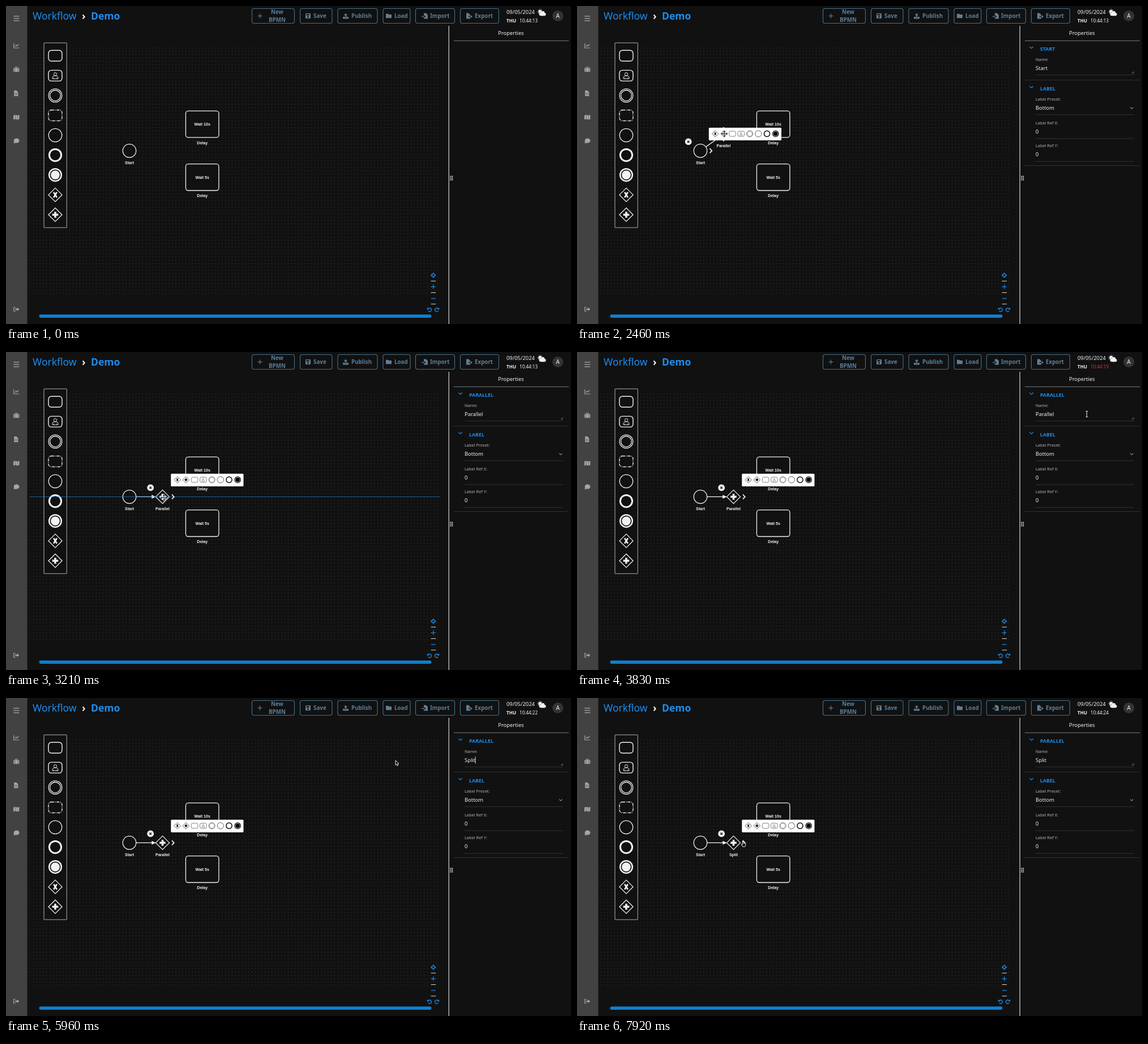
Recreate the animation shown at these times as an HTML page with a canvas. Size 998x561 px, loop 8 s.

```html
<!DOCTYPE html>
<html lang="en">
<head>
<meta charset="utf-8">
<title>Workflow editor</title>
<style>
html, body { margin: 0; width: 100%; height: 100%; overflow: hidden; background: #111; }
canvas { display: block; width: 998px; height: 561px; }
</style>
</head>
<body>
<canvas id="stage" width="998" height="561"></canvas>
<script>
const LOOP = 8000, W = 998, H = 561, GRID = 5.85, TAU = Math.PI * 2;
const BG = '#111', FG = '#f2f2f2', BLUE = '#1b8df0', STEEL = '#5b7f9a';
const UI = '"Noto Sans", sans-serif', DIAGRAM = '"Liberation Sans", Arial, sans-serif';
const START = { x: 218, y: 255.4 };
const screen = document.getElementById('stage').getContext('2d');
let c = screen;

function text(str, x, y, size, color = FG, weight = 400, align = 'left', family = UI) {
  c.font = `${weight} ${size}px ${family}`;
  c.fillStyle = color;
  c.textAlign = align;
  c.fillText(str, x, y);
}
const label = (str, x, y) => text(str, x, y + 2.5, 7.02, FG, 700, 'center', DIAGRAM);

function line(points, color = FG, width = 1, dash = []) {
  c.beginPath();
  for (let i = 0; i < points.length; i += 2) c.lineTo(points[i], points[i + 1]);
  c.strokeStyle = color;
  c.lineWidth = width;
  c.setLineDash(dash);
  c.stroke();
  c.setLineDash([]);
}
function poly(points, fill, stroke, width = 1) {
  c.beginPath();
  for (let i = 0; i < points.length; i += 2) c.lineTo(points[i], points[i + 1]);
  c.closePath();
  paint(fill, stroke, width);
}
function paint(fill, stroke, width = 1) {
  c.lineWidth = width;
  if (fill) { c.fillStyle = fill; c.fill(); }
  if (stroke) { c.strokeStyle = stroke; c.stroke(); }
}
function circle(x, y, r, fill, stroke, width) {
  c.beginPath();
  c.arc(x, y, r, 0, TAU);
  paint(fill, stroke, width);
}
function box(x, y, w, h, r, fill, stroke, width) {
  c.beginPath();
  c.roundRect(x, y, w, h, r);
  paint(fill, stroke, width);
}
function at(x, y, scale, draw) {
  c.save();
  c.translate(x, y);
  c.scale(scale, scale);
  draw();
  c.restore();
}

// Diagram symbols, drawn around the origin with a half size of 12.
const task = (fg, bg) => box(-12, -9.5, 24, 19, 5, bg, fg, 1.4);
const diamond = (fg, bg) => poly([0, -12, 12, 0, 0, 12, -12, 0], bg, fg, 1.3);
const symbols = {
  task,
  user(fg, bg) {
    task(fg, bg);
    c.beginPath();
    c.moveTo(-5, 5.5);
    c.lineTo(-5, 3);
    c.quadraticCurveTo(-4.5, 0.8, -1.8, 0.2);
    c.lineTo(1.8, 0.2);
    c.quadraticCurveTo(4.5, 0.8, 5, 3);
    c.lineTo(5, 5.5);
    c.closePath();
    paint(null, fg, 0.9);
    circle(0, -2.6, 2.7, null, fg, 0.9);
    line([-2.8, 5.5, -2.8, 3.4], fg, 0.8);
    line([2.8, 5.5, 2.8, 3.4], fg, 0.8);
  },
  double(fg, bg) {
    circle(0, 0, 11.8, bg, fg, 1.3);
    circle(0, 0, 9.4, null, fg, 1.3);
  },
  dashed(fg, bg) {
    c.setLineDash([5, 1.5, 1.2, 1.5]);
    task(fg, bg);
    c.setLineDash([]);
  },
  circle: (fg, bg) => circle(0, 0, 11.7, bg, fg, 1.3),
  thick: (fg, bg) => circle(0, 0, 10.6, bg, fg, 3),
  end(fg, bg) {
    circle(0, 0, 10.8, bg, fg, 2.5);
    circle(0, 0, 7.9, fg);
  },
  exclusive(fg, bg) {
    diamond(fg, bg);
    line([-2.8, -4.6, 2.8, 4.6], fg, 2.6);
    line([2.8, -4.6, -2.8, 4.6], fg, 2.6);
  },
  parallel(fg, bg) {
    diamond(fg, bg);
    line([-5.3, 0, 5.3, 0], fg, 3.6);
    line([0, -5.3, 0, 5.3], fg, 3.6);
  }
};
const symbol = (name, x, y, scale = 1, fg = FG, bg = BG) =>
  at(x, y, scale, () => symbols[name](fg, bg));

const page = (x, color) => poly([x, -5, x + 4, -5, x + 7, -2, x + 7, 5, x, 5], color);
const icons = {
  plus(k) { line([-4, 0, 4, 0], k, 1.2); line([0, -4, 0, 4], k, 1.2); },
  save(k) {
    box(-4.5, -4.5, 9, 9, 1.2, k);
    c.fillStyle = BG;
    c.fillRect(-3, -3.2, 5, 2.4);
    circle(0, 2, 1.4, BG);
  },
  upload(k) {
    box(-5, 1.5, 10, 3.5, 0.8, k);
    poly([0, -5, 3.8, -1, 1.3, -1, 1.3, 2.6, -1.3, 2.6, -1.3, -1, -3.8, -1], k, BG, 0.6);
  },
  folder(k) { poly([-5, -3.8, -1, -3.8, 0.3, -2.6, 5, -2.6, 5, 3.8, -5, 3.8], k); },
  fileIn(k) {
    page(-2, k);
    line([-6, 1, -2, 1], k, 1.4);
    poly([-1.5, -1.5, 1.5, 1, -1.5, 3.5], BG);
  },
  fileOut(k) {
    page(-5, k);
    line([-1, 1, 2, 1], BG, 1.6);
    line([2, 1, 4, 1], k, 1.4);
    poly([3, -1.6, 6, 1, 3, 3.6], k);
  },
  menu(k) { for (const y of [-4, 0, 4]) line([-5, y, 5, y], k, 1.3); },
  chart(k) {
    line([-4.5, -4, -4.5, 4, 5, 4], k, 1.2);
    line([-2.5, 1.5, -0.5, -1, 1, 0.7, 4.2, -2.6], k, 1.2);
  },
  suitcase(k) {
    box(-5, -2.8, 10, 7, 1, k);
    box(-2, -4.4, 4, 2.4, 0.6, null, k, 1);
    line([-2.7, -2.8, -2.7, 4.2], '#424242', 0.7);
    line([2.7, -2.8, 2.7, 4.2], '#424242', 0.7);
  },
  file(k) {
    page(-4, k);
    line([-2.5, 0, 1.5, 0], '#424242', 0.8);
    line([-2.5, 2.3, 1.5, 2.3], '#424242', 0.8);
  },
  map(k) {
    for (const [x, d] of [[-5.2, 1], [-1.6, -1], [2, 1]])
      poly([x, -3.5 + d * 0.6, x + 3.1, -3.5 - d * 0.6, x + 3.1, 4 - d * 0.6, x, 4 + d * 0.6], k);
  },
  chat(k) {
    c.beginPath();
    c.ellipse(0.3, -0.4, 4.9, 4, 0, 0, TAU);
    paint(k);
    poly([-4, 1, -4.8, 4.4, -0.5, 3], k);
  },
  leave(k) {
    line([-1.5, -3.5, -4.5, -3.5, -4.5, 3.5, -1.5, 3.5], k, 1.2);
    line([-2.2, 0, 2, 0], k, 2.2);
    poly([1.4, -3.3, 5, 0, 1.4, 3.3], k);
  },
  target(k) {
    circle(0, 0, 3, null, k, 1.2);
    for (let i = 0; i < 4; i++) { line([1.2, 0, 4.8, 0], k, 1.2); c.rotate(Math.PI / 2); }
  },
  turn(k) {
    c.beginPath();
    c.arc(0, 0, 3.2, -2.5, 2.5);
    paint(null, k, 1.2);
    poly([-4.4, -4.2, -4.4, -0.5, -0.8, -0.5], k);
  }
};
const icon = (name, x, y, color) => at(x, y, 1, () => icons[name](color));

function drawGrid() {
  c.fillStyle = '#a0a0a0';
  for (let i = 0; i <= 123; i++)
    for (let j = 0; j <= 74; j++) c.fillRect(42.2 + i * GRID, 73.8 + j * GRID, 0.6, 0.6);
}

function drawHeader() {
  text('Workflow', 47, 24, 17.5, BLUE);
  text('›', 134, 24, 18, FG, 700);
  text('Demo', 150, 24, 17.5, BLUE, 700);
  const buttons = [
    [434.5, 75, 'plus', 448.5], [519.5, 56.5, 'save', 533.5, 'Save', 543],
    [586, 70, 'upload', 600, 'Publish', 610], [666, 48, 'folder', 676, 'Load', 686],
    [723.5, 69, 'fileIn', 740, 'Import', 749], [802.5, 68, 'fileOut', 818, 'Export', 828]
  ];
  for (const [x, w, name, iconX, caption, textX] of buttons) {
    box(x, 4.5, w, 26, 3.5, null, '#46718f', 1.1);
    icon(name, iconX, 17.5, STEEL);
    if (caption) text(caption, textX, 21.2, 9.8, STEEL, 700);
  }
  text('New', 479, 14.2, 9.8, STEEL, 700, 'center');
  text('BPMN', 479, 28.2, 9.8, STEEL, 700, 'center');
  text('09/05/2024', 884, 14.2, 9.4);
  text('THU', 884, 28.7, 8.1, FG, 700);
  for (let i = 0; i < 5; i++) {
    const a = 2.4 + i * 0.75;
    line([943.5 + 4 * Math.cos(a), 10 + 4 * Math.sin(a), 943.5 + 5 * Math.cos(a), 10 + 5 * Math.sin(a)], FG, 1);
  }
  circle(943.5, 10, 3.2, FG);
  c.beginPath();
  c.arc(944.5, 14.3, 2.8, 0, TAU);
  c.arc(948, 12.4, 3.4, 0, TAU);
  c.arc(951, 14.6, 2.6, 0, TAU);
  c.rect(944.5, 13.5, 6.5, 3.7);
  paint(FG, BG, 0.7);
  c.fill();
  circle(974.8, 17.5, 9.6, '#333');
  text('A', 974.8, 21.1, 10, FG, 400, 'center');
}

function drawStatic() {
  c.fillStyle = BG;
  c.fillRect(0, 0, W, H);
  drawGrid();
  c.fillStyle = '#424242';
  c.fillRect(0, 0, 37.5, H);
  ['menu', 'chart', 'suitcase', 'file', 'map', 'chat', 'leave'].forEach((name, i) =>
    icon(name, 18.3, i === 0 ? 22 : i === 6 ? 535 : 28 + i * 42, '#a6a6a6'));
  drawHeader();

  box(67, 65, 40.3, 326, 0.5, BG, '#c4c4c4', 0.9);
  ['task', 'user', 'double', 'dashed', 'circle', 'thick', 'end', 'exclusive', 'parallel']
    .forEach((name, i) => symbol(name, 87, 87.8 + i * 35.05));

  symbol('circle', START.x, START.y);
  label('Start', START.x, 276);
  [['Wait 10s', 208.5], ['Wait 5s', 302.1]].forEach(([name, y]) => {
    box(317.45, y - 23.4, 58.5, 46.8, 4.5, BG, FG, 1.3);
    label(name, 346.7, y);
    label('Delay', 346.7, y + 32.5);
  });

  box(58.5, 544.3, 693, 5.6, 2.8, '#0f7fd0');
  icon('target', 754.8, 475, BLUE);
  icon('plus', 754.8, 495.3, BLUE);
  line([751, 516, 758.8, 516], BLUE, 1.2);
  for (const y of [485.3, 505.6, 525.8]) line([750.7, y, 759.2, y], '#ddd', 1);
  icon('turn', 748.3, 536, BLUE);
  c.save();
  c.translate(760.8, 536);
  c.scale(-1, 1);
  icons.turn(BLUE);
  c.restore();

  line([782.3, 35, 782.3, H], '#d8d8d8', 1.2);
  for (let i = 0; i < 6; i++) c.fillStyle = '#ddd', c.fillRect(784.4 + (i % 2) * 3, 299.7 + (i >> 1) * 3, 1.9, 1.9);
  text('Properties', 892, 51.4, 9.4, FG, 400, 'center');
  line([791, 61.3, 994, 61.3], '#8a8a8a', 0.9);
}

function nameAt(t) {
  const typed = [5210, 5460, 5670, 5790, 5960].filter(key => t >= key).length;
  return t < 2500 ? 'Start' : typed ? 'Split'.slice(0, typed) : 'Parallel';
}

function drawProperties(t, cursorX) {
  const rule = (y, x0, x1, color) => line([x0, y, x1, y], color, 0.8);
  const section = (title, y) => {
    line([799.5, y - 7.5, 802.7, y - 4.5, 805.9, y - 7.5], BLUE, 1.2);
    text(title, 818, y, 8.8, BLUE, 700);
  };
  const field = (caption, value, y) => {
    text(caption, 810, y, 7.4, '#b4b4b4');
    text(value, 810, y + 16.2, 9.4);
    rule(y + 25.2, 810, 984, '#3c3c3c');
  };
  const name = nameAt(t);
  section(t < 2500 ? 'START' : 'PARALLEL', 79.3);
  if (t >= 4130 && t < 5210) {
    const left = Math.min(842.5, Math.max(810, cursorX));
    c.fillStyle = '#2a6fc4';
    c.fillRect(left, 103, 842.5 - left, 13.5);
  }
  field('Name:', name, 96.5);
  if (t >= 5210 && t < 6880) {
    const x = 810 + c.measureText(name).width;
    c.font = `9.4px ${UI}`;
    line([810 + c.measureText(name).width, 103.3, x, 115.7], FG, 0.9);
  }
  line([980, 119, 984, 115.5], '#aaa', 0.7);
  line([982.3, 119, 984, 117.5], '#aaa', 0.7);
  rule(130.7, 791, 994, '#3a3a3a');
  section('LABEL', 149);
  field('Label Preset:', 'Bottom', 166.5);
  line([977.2, 178.8, 979.8, 181.4, 982.4, 178.8], '#ddd', 1);
  field('Label Ref X:', '0', 208.7);
  field('Label Ref Y:', '0', 249);
  rule(281.5, 791, 994, '#3a3a3a');
}

function drawToolbar({ x, y }) {
  circle(x - 21.3, y - 16, 5.9, FG);
  line([x - 23.1, y - 17.8, x - 19.5, y - 14.2], '#111', 1.3);
  line([x - 19.5, y - 17.8, x - 23.1, y - 14.2], '#111', 1.3);
  line([x + 16.5, y - 4, x + 20.3, y, x + 16.5, y + 4], FG, 1.7);
  box(x + 14.8, y - 40.6, 128.2, 22.2, 1.5, '#fff');
  ['exclusive', 'parallel', 'task', 'user', 'double', 'circle', 'thick', 'end'].forEach((name, i) =>
    symbol(name, x + 26.2 + i * 15.22, y - 30, 0.48, i > 1 && i < 5 ? '#444' : '#000', '#fff'));
}

function drawLink(to) {
  const dx = to.x - START.x, dy = to.y - START.y, d = Math.hypot(dx, dy);
  const reach = 11.7 * d / (Math.abs(dx) + Math.abs(dy));
  at(START.x, START.y, 1, () => {
    c.rotate(Math.atan2(dy, dx));
    const tip = d - reach;
    line([11.7, 0, tip - 5, 0], FG, 1.3);
    poly([tip, 0, tip - 7.5, -3.3, tip - 7.5, 3.3], FG);
  });
}

// Pointer path: time, x, y and, when it changes, the pointer style.
const path = [
  [580, 334, 526, 'arrow'], [670, 258, 437], [830, 256, 434], [1170, 208, 259, 'move'],
  [1330, 208, 259], [1400, 218, 256, 'arrow'], [1630, 248, 240], [1670, 257, 240],
  [1830, 259, 240], [2120, 260, 234, 'hand'], [2290, 261, 227], [2455, 260, 225, 'move'],
  [2750, 278, 245], [3200, 279, 257], [3320, 279, 257, 'arrow'], [3760, 894, 110, 'text'],
  [3830, 900.5, 109.5], [3900, 900, 109.5], [4080, 852, 110], [4130, 850, 110],
  [4330, 688, 110, 'arrow'], [6540, 688, 110], [6710, 425, 235], [6880, 424, 245],
  [7380, 278, 256, 'move'], [7710, 278, 256], [7800, 289, 254, 'hand'], [7900, 294, 253]
];
function pointerAt(t) {
  if (t < path[0][0]) return { x: 0, y: 0 };
  const next = path.findIndex(p => p[0] > t);
  const last = next < 0 ? path.length - 1 : next - 1;
  const a = path[last], b = path[last + 1] || a;
  const f = b === a ? 0 : (t - a[0]) / (b[0] - a[0]);
  let k = last;
  while (!path[k][3]) k--;
  return { x: a[1] + (b[1] - a[1]) * f, y: a[2] + (b[2] - a[2]) * f, style: path[k][3] };
}

const pointers = {
  arrow() { poly([0, 0, 0, 8.4, 2, 6.7, 3.4, 9.5, 4.8, 8.8, 3.5, 6.1, 6, 5.8], '#111', '#fff', 0.9); },
  text() {
    line([0, -4.5, 0, 4.5], FG, 1);
    line([-2, -5, 2, -5], FG, 0.9);
    line([-2, 5, 2, 5], FG, 0.9);
  },
  move() {
    const arm = [1, -1, 1, -3.2, 2.8, -3.2, 0, -6.4, -2.8, -3.2, -1, -3.2, -1, -1];
    for (let i = 0; i < 4; i++) { poly(arm, '#222', '#eee', 0.8); c.rotate(Math.PI / 2); }
    circle(0, 0, 1.1, '#222');
  },
  hand() {
    poly([-2, -0.5, -0.7, -0.8, 0, 3, 3, 3.3, 4, 4.2, 3.6, 7.4, 2.6, 9.4, -1.2, 9.4, -3.6, 6, -3.4, 4.9, -1.5, 5.6],
      '#111', '#fff', 0.9);
  }
};

const snap = v => Math.round(v / GRID) * GRID;
function nodeAt(t) {
  if (t >= 3200) return { x: 276.5, y: START.y };
  const p = pointerAt(t);
  return { x: 276.5 + snap(p.x - 278), y: 243.7 + snap(p.y - 245) };
}
function drawGuide(y) {
  const near = v => Math.abs(y - v) < 1;
  const guide = near(START.y) ? START.y : near(243.7) ? 232.3 : near(232) ? 243.7 : 0;
  if (guide) line([42, guide, 767, guide], '#1c8ef2', 1, [1.5, 0.8]);
}

function drawClock(t) {
  const steps = [[7500, 24], [6560, 23], [5560, 22], [4520, 21], [4230, 20], [3500, 19], [0, 13]];
  const seconds = steps.find(s => t >= s[0])[1];
  text('10:44:' + seconds, 907, 28.7, 8.1, seconds === 19 ? '#b9403c' : FG);
}

const base = document.createElement('canvas');
base.width = W;
base.height = H;
c = base.getContext('2d');
drawStatic();
c = screen;

function render(t) {
  const pointer = pointerAt(t), node = nodeAt(t);
  const selected = t >= 1330 && t < 6900 || t >= 7500;
  c.drawImage(base, 0, 0);
  drawClock(t);
  if (t >= 2440) {
    drawLink(node);
    symbol('parallel', node.x, node.y);
    label(t < 6900 ? 'Parallel' : 'Split', node.x, node.y + 20.8);
    if (t < 3300) drawGuide(node.y);
  }
  if (selected) {
    drawToolbar(t < 2500 ? START : node);
    drawProperties(t, pointer.x);
  }
  if (pointer.style) at(pointer.x, pointer.y, 1, pointers[pointer.style]);
}

const begin = performance.now();
function tick() {
  render((performance.now() - begin) % LOOP);
  requestAnimationFrame(tick);
}
tick();
</script>
</body>
</html>
```
